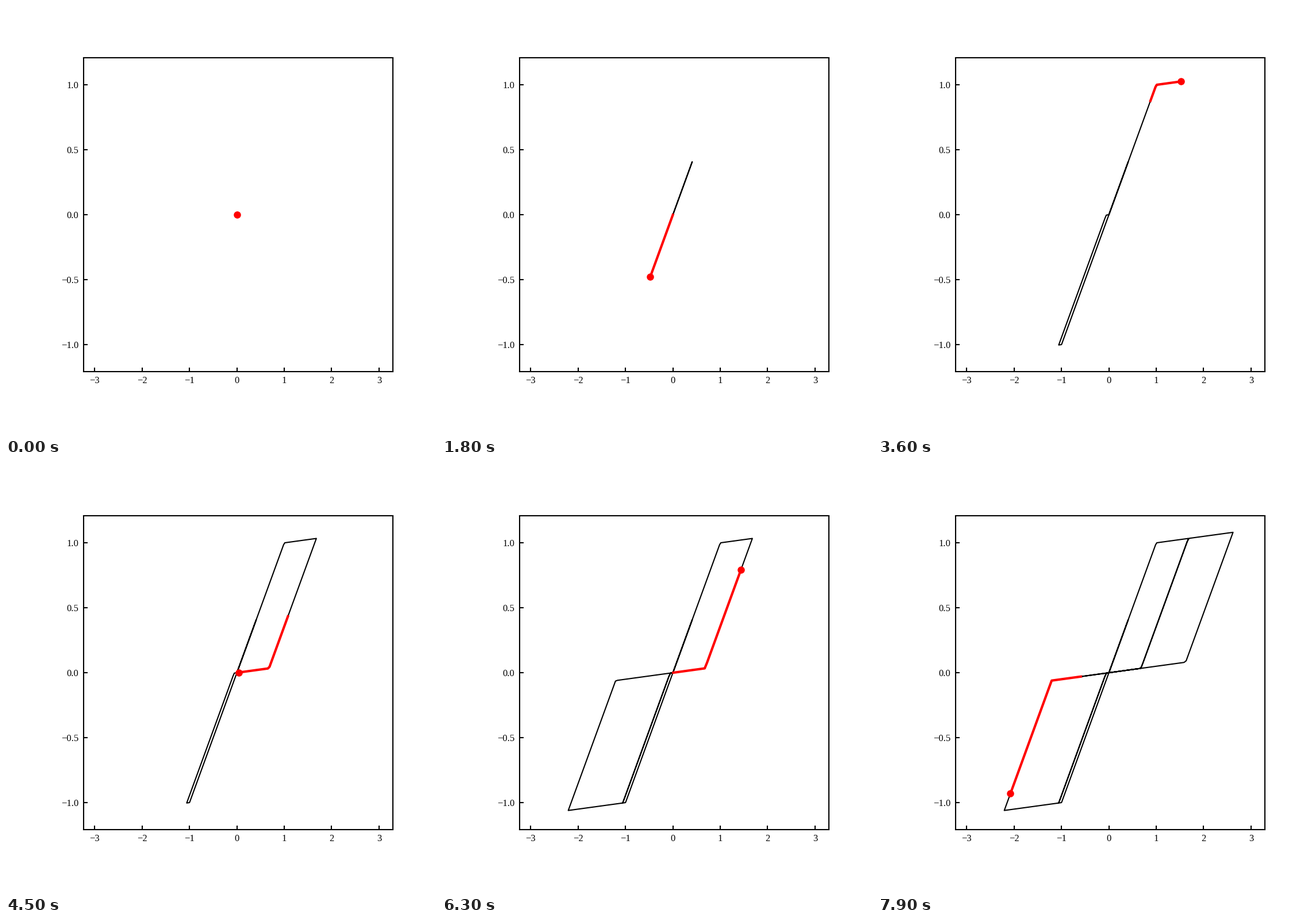
Write a matplotlib script that moves like this. It is 748 px wide and 748 px high and loops after 8000 ms.

```python
import numpy as np
import matplotlib.pyplot as plt
from matplotlib.animation import FuncAnimation

FRAMES, INTERVAL = 80, 100
STEPS = 10          # load steps per frame
TRAIL = 30          # load steps in the highlighted trail
HARDENING = 0.05

plt.rcParams.update({
    "font.family": "Liberation Serif",
    "font.size": 12,
    "axes.linewidth": 1.5,
    "lines.linewidth": 1.5,
})


def loading(n):
    """Oscillating displacement with a slowly growing envelope."""
    phase = 0.02095 * np.arange(n)
    return 3 * np.sin(0.075 * phase) * np.sin(phase)


def slip_response(x):
    """Bilinear slip hysteresis: each side slips up to its own plastic set."""
    peak_pos = np.maximum.accumulate(np.maximum(x, 0))
    peak_neg = np.maximum.accumulate(np.maximum(-x, 0))
    slip = np.maximum(np.where(x >= 0, peak_pos, peak_neg) - 1, 0)
    elastic = np.clip(np.abs(x) - slip, 0, 1)
    return HARDENING * x + (1 - HARDENING) * np.sign(x) * elastic


def padded(v, margin=0.05):
    pad = margin * np.ptp(v)
    return v.min() - pad, v.max() + pad


x = loading(1200)
y = slip_response(x)

fig, ax = plt.subplots(figsize=(7.48, 7.48), dpi=100)
fig.subplots_adjust(left=0.18, right=0.9, bottom=0.15, top=0.88)
ax.set(xlim=padded(x), ylim=padded(y),
       xticks=np.arange(-3, 4), yticks=np.arange(-1, 1.1, 0.5))
ax.tick_params(direction="in", length=5, width=1.5, pad=6)

curve, = ax.plot([], [], color="black")
trail, = ax.plot([], [], color="red", lw=3)
dot, = ax.plot([], [], "o", color="red", ms=8)


def update(frame):
    end = frame * STEPS
    start = max(end - TRAIL, 0)
    last = max(end - 1, 0)
    curve.set_data(x[:end], y[:end])
    trail.set_data(x[start:end], y[start:end])
    dot.set_data([x[last]], [y[last]])
    return curve, trail, dot


anim = FuncAnimation(fig, update, frames=FRAMES, interval=INTERVAL,
                     repeat=True, repeat_delay=0)
plt.show()
```
